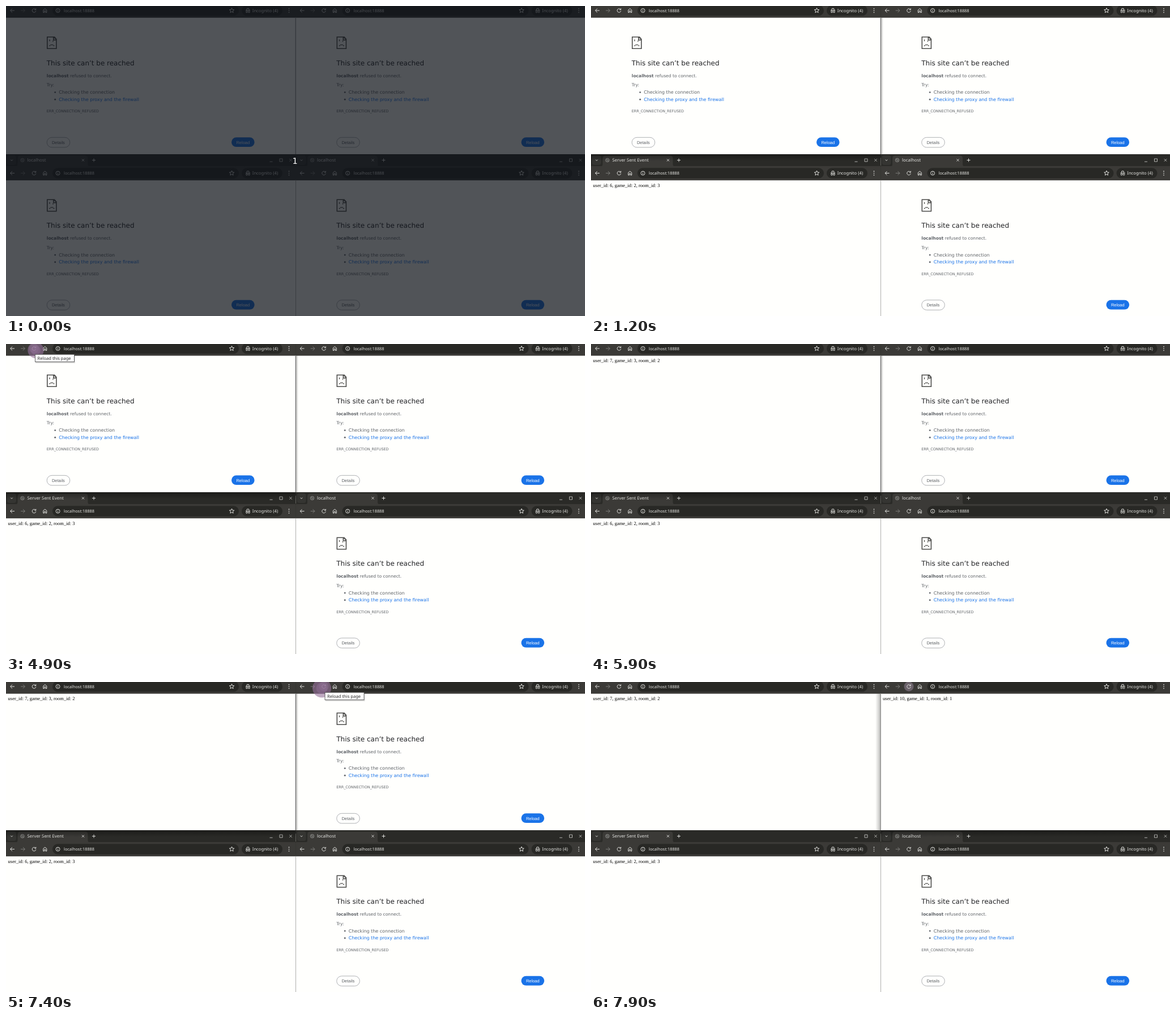
An HTML page for the animation above (8 s loop, 1022 by 548 pixels).

```html
<!DOCTYPE html>
<html lang="en">
<head>
<meta charset="utf-8">
<title>Four browser windows</title>
<style>
  html, body { margin: 0; width: 100%; height: 100%; overflow: hidden; background: #fffffd; }
  svg { display: block; width: 1022px; height: 548px; text-rendering: geometricPrecision; }
  .ui { font-family: "Noto Sans", sans-serif; fill: #e6e6e3; }
  .page { font-family: "DejaVu Sans", sans-serif; font-size: 7.6px; fill: #5f6368; }
  .btn { font-family: "Liberation Sans", Arial, sans-serif; font-size: 7.5px; }
  .log { font-family: "Liberation Serif", "Times New Roman", serif; font-size: 8.53px; fill: #000; }
  .line { fill: none; stroke: #e0e0dd; stroke-width: 1; }
  .dim { stroke: #7b7b78; }
</style>
</head>
<body>
<svg id="stage" viewBox="0 0 1022 548" xmlns="http://www.w3.org/2000/svg"></svg>
<script>
const LOOP = 8000, STEP = 100, COL = 511.5, ROW = 287.5;

const text = (x, y, s, attrs = '') => `<text x="${x}" y="${y}" ${attrs}>${s}</text>`;
const line = (d, attrs = 'class="line"') => `<path d="${d}" ${attrs}/>`;
const rect = (x, y, w, h, fill, r = 0, attrs = '') =>
  `<rect x="${x}" y="${y}" width="${w}" height="${h}" rx="${r}" fill="${fill}" ${attrs}/>`;
const dot = (x, y, r, attrs) => `<circle cx="${x}" cy="${y}" r="${r}" ${attrs}/>`;

function star(cx, cy) {
  const pts = Array.from({ length: 10 }, (_, i) => {
    const a = (i / 5 - 0.5) * Math.PI, r = i % 2 ? 2 : 4.5;
    return (cx + r * Math.cos(a)).toFixed(2) + ' ' + (cy + r * Math.sin(a)).toFixed(2);
  });
  return line('M' + pts.join('L') + 'Z');
}

const tabStrip = id =>
  line('M0 -3V-19.5Q0 -25.5 6 -25.5H505Q511 -25.5 511 -19.5V-3Z', 'fill="#2a2a27"') +
  rect(2, -23.5, 16, 17, '#353532', 4) +
  line('M8.2 -15.8L10 -14L11.8 -15.8') +
  line('M17 -4Q20.5 -4 20.5 -8V-18Q20.5 -23 25.5 -23H139.5Q144.5 -23 144.5 -18V-8Q144.5 -4 148 -4Z', 'fill="#3b3a37"') +
  dot(29, -15, 3.3, 'fill="#555552" stroke="#858582" stroke-width=".9"') +
  line('M26.8 -17.2L31.2 -12.8', 'stroke="#858582" stroke-width=".9"') +
  text(37.6, -12.3, 'localhost', `id="${id}-title" class="ui" font-size="7.8"`) +
  line('M134 -17L138 -13M138 -17L134 -13') +
  line('M152 -15H158M155 -18V-12') +
  line('M465.5 -12.3H470.5M483 -17.5H488V-12.5H483ZM500.3 -17.2L504.7 -12.8M504.7 -17.2L500.3 -12.8', 'class="line" opacity=".75"');

const toolbar = id =>
  rect(0, -4.5, 511, 25.2, '#3b3a37') +
  dot(49.5, 8, 8.5, `id="${id}-hover" fill="#6b626b" opacity="0"`) +
  line('M15 8H7.8M11 4.6L7.6 8L11 11.4') +
  line('M26.2 8H33.4M30 4.6L33.4 8L30 11.4', 'class="line dim"') +
  line('M52.3 6.2A3.3 3.3 0 1 0 52.8 8.6M52.8 4.2V6.6H50.3') +
  line('M65.8 11.5V7L68.8 4.6L71.8 7V11.5H69.9V8.7H67.7V11.5Z') +
  rect(82, -1.2, 329, 18.4, '#282825', 9.2) +
  dot(91.6, 8, 3.5, 'class="line"') + line('M91.6 7.5V10M91.6 5.7V6.6') +
  text(102, 10.7, 'localhost:18888', 'class="ui" font-size="7.35"') +
  star(398.5, 8) +
  rect(416, -1.2, 72, 18.4, '#282825', 9.2) +
  line('M422.8 7.7H431.2M424.8 7L425.4 4.4H428.6L429.2 7') +
  dot(425, 10.3, 1.4, 'class="line"') + dot(429, 10.3, 1.4, 'class="line"') +
  text(434.8, 10.7, 'Incognito (4)', 'class="ui" font-size="7.67"') +
  [4.7, 8, 11.3].map(y => dot(499.5, y, 0.85, 'fill="#e0e0dd"')).join('');

const sadPage =
  line('M83.8 54.8H72.8V75.3H88.9V60.3H83.8V54.8H85.6V56.4H87.2V58.2H88.9V60.3', 'fill="none" stroke="#4e4e4c" stroke-width="1.6"') +
  line('M77 59.3V62.3M83 61.3V63.3M78.3 68.6H83.4M76.3 70.2H78.3M83.4 70.2H85.3', 'fill="none" stroke="#4e4e4c" stroke-width="1.4"');

const errorPage = id => `<g id="${id}-error" class="page">` + sadPage +
  text(71.8, 104.7, 'This site can’t be reached', 'font-size="11.98" fill="#202124"') +
  text(71.8, 125.7, '<tspan font-weight="bold">localhost</tspan> refused to connect.') +
  text(71.8, 142.4, 'Try:') +
  dot(86.7, 152.6, 1.45, '') +
  text(93.2, 155, 'Checking the connection', 'font-size="7.98"') +
  dot(86.7, 165.2, 1.45, '') +
  text(93.2, 167.7, 'Checking the proxy and the firewall', 'font-size="7.98" fill="#1a73e8"') +
  text(71.8, 188, 'ERR_CONNECTION_REFUSED', 'font-size="6.39"') +
  rect(72.2, 232.3, 40.6, 17.6, 'none', 8.8, 'stroke="#9b9ea2" stroke-width=".8"') +
  text(92.4, 243.8, 'Details', 'class="btn" text-anchor="middle"') +
  rect(398, 232.3, 40.6, 16.8, '#1a73e8', 8.4) +
  text(418.3, 243.5, 'Reload', 'class="btn" text-anchor="middle" fill="#fff"') + '</g>';

const browser = (id, col, row, message) =>
  `<g transform="translate(${col * COL} ${row * ROW})">` +
  rect(0, 20, 511, 262, '#fffffd') + tabStrip(id) + toolbar(id) + errorPage(id) +
  text(3.6, 32.3, message, `id="${id}-log" class="log"`) + '</g>';

const pointer = id => `<g id="${id}" opacity="0">` +
  dot(0, 0, 16.5, 'fill="#94709a" opacity=".6"') +
  dot(0, 0, 10, 'fill="#8d6b91" opacity=".55"') + '</g>';

const tooltip = (id, x) => `<g id="${id}" transform="translate(${x} 0)">` +
  rect(1, 20, 70, 14, '#000', 1, 'opacity=".14"') +
  rect(0.5, 18.5, 69, 13, '#fff', 0, 'stroke="#555" stroke-width=".9"') +
  text(4.6, 27.6, 'Reload this page', 'class="ui" font-size="7.55" style="fill:#2b2b2b"') + '</g>';

const fade = (id, x2, y2, flip, a) =>
  `<linearGradient id="${id}" x1="${flip ? x2 : 0}" y1="0" x2="${flip ? 0 : x2}" y2="${y2}">` +
  `<stop stop-color="#000" stop-opacity="${a}"/><stop offset="1" stop-color="#000" stop-opacity="0"/></linearGradient>`;

const stage = document.getElementById('stage');
stage.innerHTML =
  '<defs>' + fade('toRight', 1, 0, false, 0.32) + fade('toLeft', 1, 0, true, 0.26) + fade('down', 0, 1, false, 0.35) + '</defs>' +
  rect(0, 0, 1022, 548, '#30302d') +
  browser('tl', 0, 0, 'user_id: 7, game_id: 3, room_id: 2') +
  browser('tr', 1, 0, 'user_id: 10, game_id: 1, room_id: 1') +
  rect(510.5, 20.5, 1, 242, '#aaa') +
  '<g id="focusLeft">' + rect(511, 20.5, 5, 242, 'url(#toRight)') + '</g>' +
  '<g id="focusRight">' + rect(502, 20.5, 9, 242, 'url(#toLeft)') + '</g>' +
  rect(0, 262, 1022, 6, '#30302d') +
  browser('bl', 0, 1, 'user_id: 6, game_id: 2, room_id: 3') +
  browser('br', 1, 1, '') +
  rect(511, 308, 1, 240, '#b0b0ae') +
  rect(0, 262, 512, 12, 'url(#down)', 0, 'id="shadeLeft"') +
  rect(511, 262, 511, 12, 'url(#down)', 0, 'id="shadeRight"') +
  pointer('click1') + pointer('click2') + tooltip('tip1', 51) + tooltip('tip2', 562.5) +
  '<g id="countdown">' + rect(0, 0, 1022, 548, '#0e131a', 0, 'opacity=".72"') +
  text(510.2, 279.2, '1', 'text-anchor="middle" font-family="DejaVu Sans, sans-serif" font-size="14.5" fill="#fff"') + '</g>';

const el = Object.fromEntries([...stage.querySelectorAll('g[id],text[id],rect[id],circle[id]')].map(n => [n.id, n]));
const show = (id, on) => el[id].setAttribute('visibility', on ? 'visible' : 'hidden');
const alpha = (id, a) => el[id].setAttribute('opacity', a);

function load(id, done) {
  show(id + '-error', !done);
  show(id + '-log', done);
}

// Click halo: grows for 600 ms, then fades.
function halo(id, x, age, fadeTime) {
  const on = age >= 0 && age < 600 + fadeTime;
  const grow = Math.min(1, (age + STEP) / 700);
  alpha(id, on ? Math.min(1, 1 - (age - 600) / fadeTime) : 0);
  el[id].setAttribute('transform', `translate(${x} 11) scale(${Math.max(0.1, grow)})`);
}

function draw(ms) {
  const t = Math.floor(ms / STEP) * STEP;
  const within = (a, b) => t >= a && t < b;
  show('countdown', t < 100);
  load('bl', t >= 100);
  load('tl', t >= 5100);
  load('tr', t >= 7800);
  el['bl-title'].textContent = t < 100 ? 'localhost' : 'Server Sent Event';
  show('focusLeft', within(1200, 7700));
  show('shadeLeft', within(1200, 7700));
  show('focusRight', t >= 7700);
  show('shadeRight', t >= 7700);
  alpha('tl-hover', within(4000, 5900) ? (t < 4100 ? 0.5 : 0.75) : 0);
  alpha('tr-hover', t >= 6600 ? (t < 7700 ? 0.75 : 1) : 0);
  show('tip1', within(4500, 5100));
  show('tip2', within(7000, 7700));
  halo('click1', 52.5, t - 4400, 700);
  halo('click2', 557.5, t - 6800, 500);
}

const start = performance.now();
function tick() {
  draw((performance.now() - start) % LOOP);
  requestAnimationFrame(tick);
}
tick();
</script>
</body>
</html>
```
